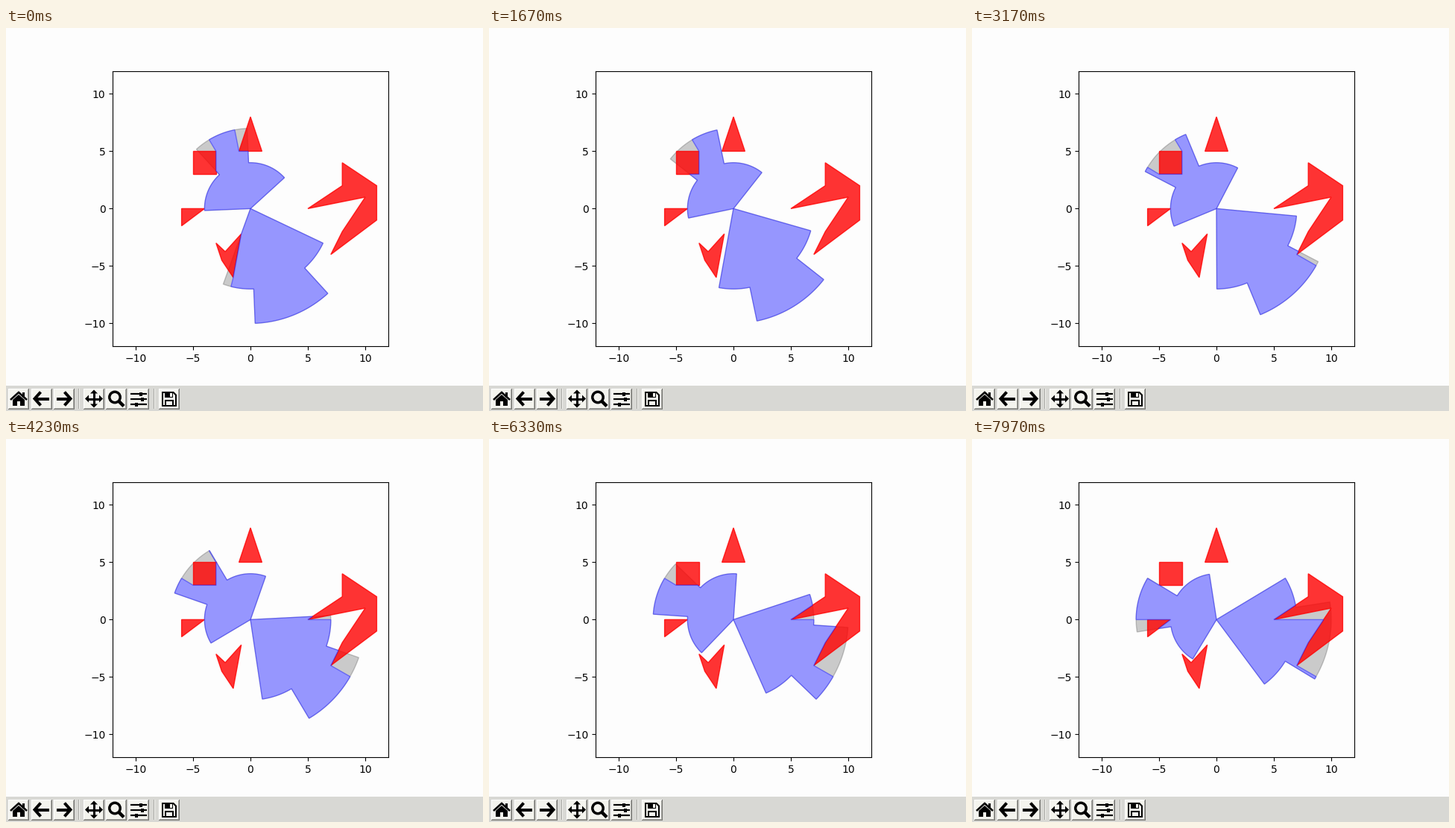
A matplotlib script that plays this animation: 640x514 px, repeating every 8000 ms.

```python
import numpy as np
import matplotlib.pyplot as plt
from matplotlib.animation import FuncAnimation
from matplotlib.patches import Circle, Polygon, Rectangle

W, H, DPI = 640, 514, 100
FRAMES, INTERVAL = 250, 32
PAPER, BAR, KEY = "#fdfdfd", "#d8d8d4", "#f4f4ee"
RED, BLUE, BLACK = (1, 0, 0, 0.8), "#9696fe", (0, 0, 0, 0.2)
BLUE_EDGE = (0, 0, 1, 0.4)

OBSTACLES = [
    [(-1, 5), (1, 5), (0, 8)],
    [(-5, 3), (-3, 3), (-3, 5), (-5, 5)],
    [(-6, 0), (-4, 0), (-6, -1.5)],
    [(-3, -3), (-2.2, -3.75), (-0.8, -2.2), (-1.5, -6), (-2.5, -4.5)],
    [(5, 0), (8, 2), (8, 4), (11, 2), (11, -1), (7, -4), (8, -2), (10, 1)],
]
STARTS = np.array([p for shape in OBSTACLES for p in shape], float)
ENDS = np.array([p for shape in OBSTACLES for p in shape[1:] + shape[:1]], float)
CORNERS = np.degrees(np.arctan2(STARTS[:, 1], STARTS[:, 0]))

# heading offset, wide half-angle, wide radius, narrow half-angle, narrow radius
FIELDS = [(0, 70, 4, 20, 7), (180, 42.2, 7, 20, 10)]

# heading of the upper field over time (seconds, degrees)
TIMES = [0, 1.67, 3.17, 4.23, 5.13, 6.33, 8]
HEADINGS = [112.35, 121.85, 132.5, 140.75, 147.4, 156.3, 169.1]


def cross(a, b):
    return a[..., 0] * b[..., 1] - a[..., 1] * b[..., 0]


def ray_lengths(u):
    """Distance to the nearest obstacle along each unit vector."""
    u = u[:, None, :]
    side = ENDS - STARTS
    with np.errstate(divide="ignore", invalid="ignore"):
        den = cross(u, side)
        r = cross(STARTS, side) / den
        s = cross(STARTS, u) / den
        hit = (s >= 0) & (s <= 1) & (r > 0)
    return np.where(hit, r, np.inf).min(axis=1)


def outlines(heading, wide, near, narrow, far):
    """Full and visible outline of one field of view."""
    eps = 1e-4
    corners = (CORNERS - heading + 180) % 360 - 180
    keys = np.concatenate([corners, [-narrow, narrow]])
    d = np.concatenate([np.linspace(-wide, wide, 161), keys - eps, keys + eps])
    d = np.unique(d[np.abs(d) <= wide])
    a = np.radians(d + heading)
    u = np.column_stack([np.cos(a), np.sin(a)])
    reach = np.where(np.abs(d) <= narrow, far, near)
    seen = np.minimum(reach, ray_lengths(u))
    return [np.vstack([[0, 0], u * r[:, None]]) for r in (reach, seen)]


fig = plt.figure(figsize=(W / DPI, H / DPI), dpi=DPI, facecolor=PAPER)
ax = fig.add_axes([143.2 / W, 86.8 / H, 369.6 / W, 369.6 / H], facecolor=PAPER)
ax.set(xlim=(-12, 12), ylim=(-12, 12))
ax.set_xticks(range(-10, 11, 5))
ax.set_yticks(range(-10, 11, 5))

full, seen = [], []
for _ in FIELDS:
    full.append(ax.add_patch(Polygon([(0, 0)] * 3, fc=BLACK, ec=BLACK, lw=1, zorder=1)))
    seen.append(ax.add_patch(Polygon([(0, 0)] * 3, fc=BLUE, ec=BLUE_EDGE, lw=1, zorder=3)))
for corners in OBSTACLES:
    ax.add_patch(Polygon(corners, fc=RED, ec=RED, lw=1, zorder=2))

# toolbar, in pixels from the top left
bar = fig.add_axes([0, 0, 1, 1])
bar.set(xlim=(0, W), ylim=(H, 0))
bar.axis("off")


def box(x, y, w, h, color="black"):
    bar.add_patch(Rectangle((x, y), w, h, fc=color, lw=0))


def shape(*points, color="black"):
    bar.add_patch(Polygon(points, fc=color, lw=0))


def stroke(*points, width=3.5, color="black"):
    x, y = zip(*points)
    bar.plot(x, y, color=color, lw=width * 72 / DPI,
             solid_capstyle="butt", solid_joinstyle="miter")


def button(x):
    box(x, 484, 28, 28, "#767672")
    box(x, 484, 27, 27, "#ffffff")
    box(x + 1, 485, 26, 26, "#a8a8a4")
    box(x + 1, 485, 25, 25, KEY)


def home(x, y):
    stroke((x - 11, y + 1), (x, y - 9), (x + 11, y + 1), width=2.6)
    box(x + 5, y - 9, 3, 7)
    shape((x - 8, y + 1), (x, y - 6), (x + 8, y + 1), (x + 8, y + 9), (x - 8, y + 9))
    box(x - 2, y + 3, 4, 6, KEY)


def arrow(x, y, way):
    stroke((x + way, y - 9), (x + 9 * way, y), (x + way, y + 9), width=4)
    stroke((x - 10 * way, y), (x + 8 * way, y), width=4)


def pan(x, y):
    stroke((x - 9, y), (x + 9, y), width=3)
    stroke((x, y - 9), (x, y + 9), width=3)
    for k in (-1, 1):
        shape((x + 12 * k, y), (x + 7 * k, y - 5), (x + 7 * k, y + 5))
        shape((x, y + 12 * k), (x - 5, y + 7 * k), (x + 5, y + 7 * k))


def zoom(x, y):
    bar.add_patch(Circle((x - 2, y - 2), 7.2, fill=False, lw=2.5))
    stroke((x + 3, y + 3), (x + 10, y + 10), width=4.5)


def sliders(x, y):
    for dy, knob in ((-7, 3), (0, 5), (7, -3)):
        stroke((x - 11, y + dy), (x + 11, y + dy), width=2.2)
        box(x + knob - 3.5, y + dy - 3, 6, 6, KEY)
        box(x + knob - 2.5, y + dy - 2.5, 4, 5)


def save(x, y):
    shape((x - 10, y - 10), (x + 6, y - 10), (x + 10, y - 6), (x + 10, y + 10), (x - 10, y + 10))
    shape((x - 8, y - 8), (x + 5, y - 8), (x + 8, y - 5), (x + 8, y + 8), (x - 8, y + 8), color=KEY)
    box(x - 6, y - 9, 11, 7)
    box(x + 1, y - 8, 2.5, 4.5, KEY)
    box(x - 6, y + 1, 12, 8)
    box(x - 4.3, y + 2.7, 8.6, 5.5, KEY)


box(0, 480, W, 34, BAR)
for left in (3, 34, 64, 104, 134, 164, 205):
    button(left)
for x in (97, 198):
    box(x, 484, 1, 27, "#a8a8a4")
    box(x + 1, 484, 1, 27, "#f4f4f0")
home(17, 498)
arrow(47.5, 497.5, -1)
arrow(77.5, 497.5, 1)
pan(118, 497.5)
zoom(148, 497.5)
sliders(178, 498)
save(219, 498)


def update(i):
    turn = np.interp(i * INTERVAL / 1000, TIMES, HEADINGS)
    for (offset, *dims), back, front in zip(FIELDS, full, seen):
        whole, visible = outlines(turn + offset, *dims)
        back.set_xy(whole)
        front.set_xy(visible)
    return full + seen


anim = FuncAnimation(fig, update, frames=FRAMES, interval=INTERVAL,
                     repeat=True, repeat_delay=0, blit=False)
plt.show()
```
